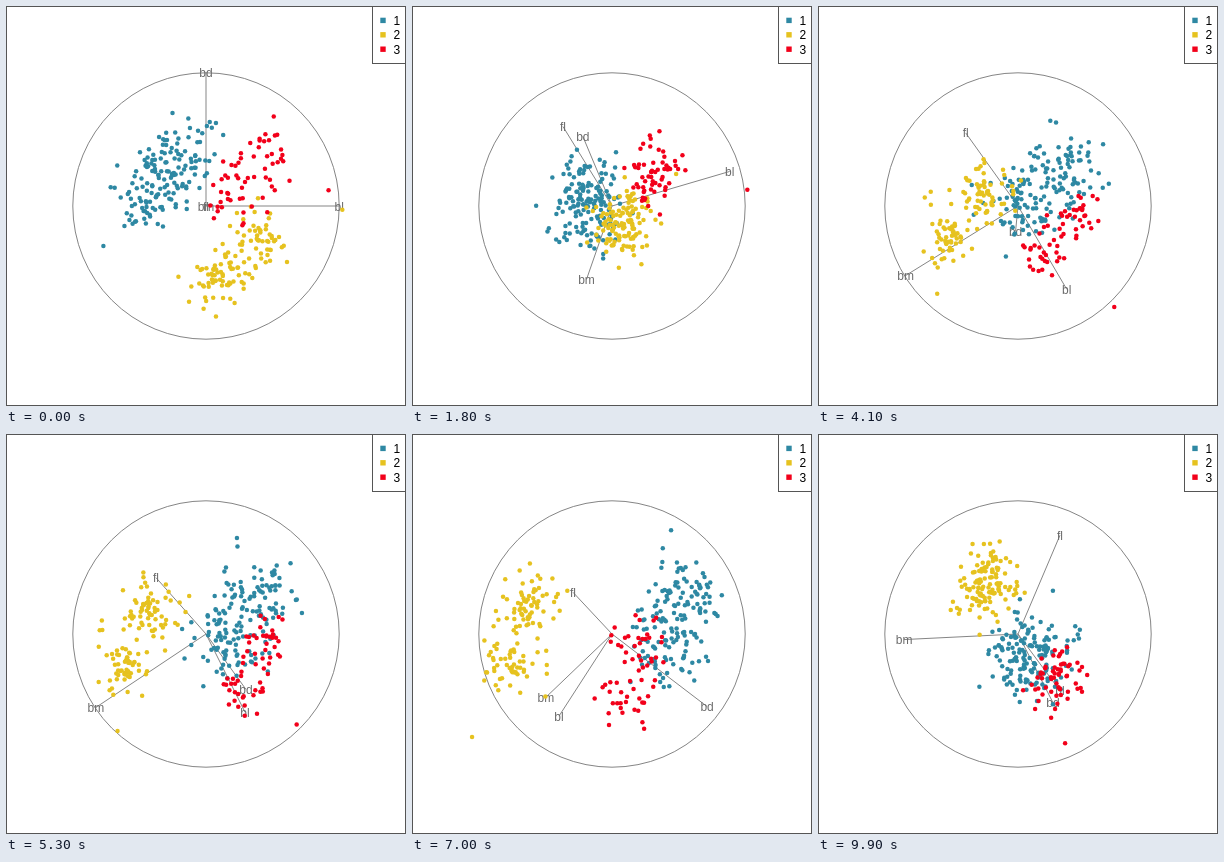
These frames come from a looping animation (400x400 px, 10 s). An HTML page with a canvas:

```html
<!DOCTYPE html>
<html lang="en">
<head>
<meta charset="utf-8">
<title>Tour of four variables</title>
<style>
html, body { margin: 0; width: 100%; height: 100%; overflow: hidden; background: #fff; }
canvas { display: block; }
</style>
</head>
<body>
<canvas id="stage" width="400" height="400"></canvas>
<script>
const ctx = document.getElementById('stage').getContext('2d');
const STEP = 100, STEPS = 100, MID = 200, RADIUS = 133.2, UNIT = 47.5;
const LABELS = ['bl', 'bd', 'fl', 'bm'];

// Step, then the x and y parts of the projection for each variable
const KEYS = [
  [0, [1, 0, 0, 0], [0, 1, 0, 0]],
  [8, [.977, .06, -.158, .13], [.053, .81, .556, -.15]],
  [29, [.571, -.406, -.466, -.556], [-.06, .233, .617, -.752]],
  [44, [.32, .09, -.365, -.87], [-.68, -.27, .48, -.48]],
  [53, [.293, .3, -.376, -.827], [-.586, -.414, .421, -.564]],
  [70, [-.398, .714, -.293, -.496], [-.624, -.549, .316, -.481]],
  [82, [-.226, .647, -.128, -.714], [-.752, -.353, .534, -.18]],
  [99, [.316, .263, .316, -.857], [-.43, -.519, .744, -.038]]
];

// Every cluster is two overlapping clouds, SPLIT to either side of its mean
const SPLIT = [.34, .36, .25, .45], SPREAD = [.36, .4, .39, .36];
const CLUSTERS = [
  { color: '#2e88a3', count: 157, scale: 1.13, mean: [-.88, .58, -.77, -.63], outlier: [-2.16, -.84, -.92, -1.44] },
  { color: '#e6c21f', count: 122, scale: .9, mean: [.64, -1.1, 1.15, 1.08], outlier: [2.87, -.08, 2.07, 2.3] },
  { color: '#f2001a', count: 60, scale: .9, mean: [.96, .66, -.32, -.55], outlier: [2.58, .33, -1.42, -.63] }
];

let seed = 11;
function random() {
  seed = (seed + 0x6d2b79f5) | 0;
  let t = Math.imul(seed ^ (seed >>> 15), 1 | seed);
  t = (t + Math.imul(t ^ (t >>> 7), 61 | t)) ^ t;
  return (((t ^ (t >>> 14)) >>> 0) + 1) / 4294967297;
}

function normal() {
  const z = Math.sqrt(-2 * Math.log(random())) * Math.cos(2 * Math.PI * random());
  return Math.abs(z) < 2.5 ? z : normal();
}

for (const c of CLUSTERS) {
  c.points = [c.outlier];
  for (let i = 0; i < c.count; i++) {
    const side = i % 2 ? 1 : -1, shared = .25 * normal();
    c.points.push(c.mean.map((m, k) =>
      m + side * SPLIT[k] + c.scale * SPREAD[k] * (shared + .97 * normal())));
  }
}

const dot = (a, b) => a.reduce((sum, v, k) => sum + v * b[k], 0);
const unit = a => a.map(v => v / Math.sqrt(dot(a, a)));

// Slope through the neighbours of key i
function slope(i, axis, k) {
  const a = KEYS[Math.max(i - 1, 0)], b = KEYS[Math.min(i + 1, KEYS.length - 1)];
  return (b[axis][k] - a[axis][k]) / (b[0] - a[0]);
}

function blend(i, axis, step) {
  const a = KEYS[i], b = KEYS[i + 1], span = b[0] - a[0];
  const t = (step - a[0]) / span, u = 1 - t;
  return a[axis].map((v, k) =>
    v * u * u * (1 + 2 * t) + b[axis][k] * t * t * (3 - 2 * t) +
    span * t * u * (u * slope(i, axis, k) - t * slope(i + 1, axis, k)));
}

// Orthonormal pair of axes at a step
function projection(step) {
  let i = 0;
  while (i < KEYS.length - 2 && step >= KEYS[i + 1][0]) i++;
  const x = unit(blend(i, 1, step)), raw = blend(i, 2, step);
  const overlap = dot(x, raw);
  return [x, unit(raw.map((v, k) => v - overlap * x[k]))];
}

function disc(x, y, r) {
  ctx.beginPath();
  ctx.arc(x, y, r, 0, 2 * Math.PI);
}

function drawAxes(x, y) {
  ctx.strokeStyle = '#858585';
  ctx.lineWidth = 1;
  disc(MID, MID, RADIUS);
  ctx.stroke();
  ctx.fillStyle = '#6b6b6b';
  ctx.textAlign = 'center';
  LABELS.forEach((label, k) => {
    const px = MID + RADIUS * x[k], py = MID - RADIUS * y[k];
    ctx.beginPath();
    ctx.moveTo(MID, MID);
    ctx.lineTo(px, py);
    ctx.stroke();
    ctx.fillText(label, px, py + 4.5);
  });
}

function drawLegend() {
  ctx.strokeStyle = '#555';
  ctx.strokeRect(.5, .5, 399, 399);
  ctx.fillStyle = '#fff';
  ctx.fillRect(366.5, .5, 33, 57);
  ctx.strokeRect(366.5, .5, 33, 57);
  ctx.textAlign = 'left';
  CLUSTERS.forEach((c, i) => {
    const y = 14.4 + 14.4 * i;
    ctx.fillStyle = c.color;
    ctx.fillRect(374.3, y - 2.7, 5.4, 5.4);
    ctx.fillStyle = '#000';
    ctx.fillText(i + 1, 387.5, y + 4.5);
  });
}

function draw(step) {
  const [x, y] = projection(step);
  ctx.fillStyle = '#fff';
  ctx.fillRect(0, 0, 400, 400);
  ctx.font = '12px "Liberation Sans", Arial, sans-serif';
  drawAxes(x, y);
  for (const c of CLUSTERS) {
    ctx.fillStyle = c.color;
    for (const p of c.points) {
      disc(MID + UNIT * dot(p, x), MID - UNIT * dot(p, y), 2.25);
      ctx.fill();
    }
  }
  drawLegend();
}

const start = performance.now();
function tick() {
  draw(Math.floor((performance.now() - start) / STEP) % STEPS);
  requestAnimationFrame(tick);
}
tick();
</script>
</body>
</html>
```
